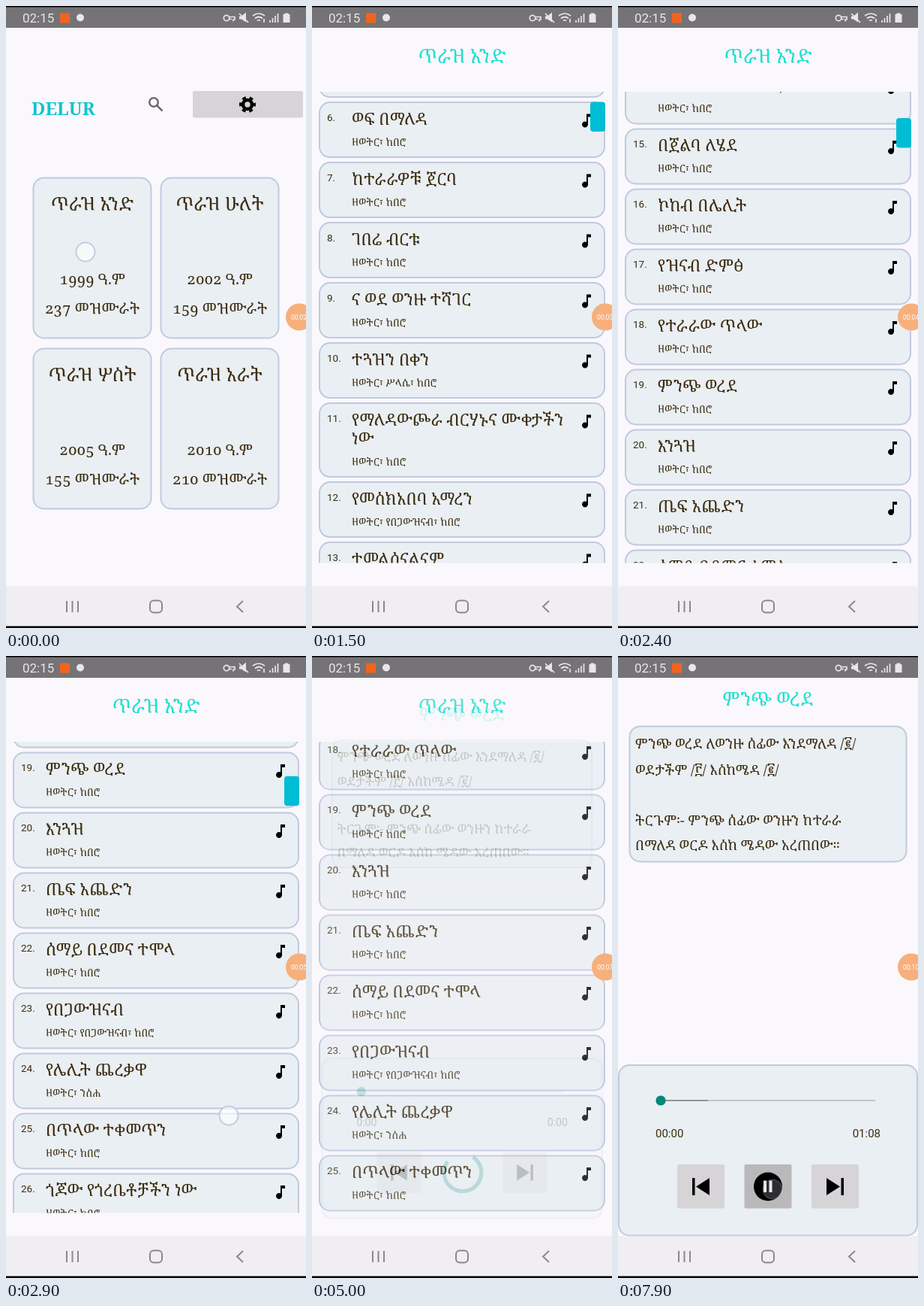
Animation of 400x827 px, one loop 8 s. Source, as an HTML page:

```html
<!DOCTYPE html>
<html lang="am">
<head>
<meta charset="utf-8">
<style>
  html, body { margin: 0; width: 100%; height: 100%; overflow: hidden; background: #faf8fc; }
  svg { display: block; width: 400px; height: 827px; }
  text { font-family: 'Noto Serif Ethiopic', 'Noto Serif', 'Noto Sans Ethiopic', serif; fill: #3d2c10; white-space: pre; }
  .ui { font-family: Roboto, sans-serif; }
  .mid { text-anchor: middle; font-variant-numeric: oldstyle-nums; }
  .head { fill: #1fe0cf; text-anchor: middle; }
  .card { fill: #e9eff3; stroke: #c0cadf; stroke-width: 2; }
  .key { fill: #d6d4d7; }
  .line { fill: none; stroke-width: 2; }
</style>
</head>
<body>
<svg viewBox="0 0 400 827">
  <defs>
    <clipPath id="window"><rect y="114" width="400" height="626.5"/></clipPath>
    <path id="note" d="M12 3v10.55c-.59-.34-1.27-.55-2-.55-2.21 0-4 1.79-4 4s1.79 4 4 4 4-1.79 4-4V7h4V3z"/>
    <rect id="page" y="29" width="400" height="743" fill="#faf8fc"/>
  </defs>

  <g id="home">
    <use href="#page"/>
    <text x="34" y="145" font-size="24" font-weight="700" style="fill:#12c3d0">DELUR</text>
    <g class="line" stroke="#6e6c6e" style="stroke-width:2.5"><circle cx="197" cy="128" r="5.8"/><path d="M201 132l7.500 7.500"/></g>
    <rect class="key" x="249" y="113" width="147" height="35.500" rx="2"/>
    <g fill="none" stroke="#000" transform="translate(322 131)">
      <circle r="6" stroke-width="4.600"/>
      <circle r="9.500" stroke-width="3" stroke-dasharray="5 4.950" stroke-dashoffset="2.500"/>
    </g>
    <g id="volumes"></g>
  </g>

  <g id="list">
    <use href="#page"/>
    <text class="head" x="200" y="76" font-size="26">ጥራዝ አንድ</text>
    <g clip-path="url(#window)"><g id="rows"></g></g>
    <rect id="thumb" x="371" y="115" width="20" height="39.500" rx="4" fill="#00bcd4"/>
  </g>

  <g id="player">
    <use href="#page"/>
    <text class="head" x="200" y="66" font-size="25">ምንጭ ወረደ</text>
    <rect class="card" x="15.500" y="93.500" width="369" height="180" rx="14"/>
    <g id="lyrics"></g>
    <rect class="card" x="1" y="544" width="398" height="226.500" rx="14"/>
    <path class="line" d="M57 591H343" stroke="#c6c6cb"/>
    <path class="line" id="buffer" d="M57 591H120" stroke="#98959a"/>
    <circle cx="57" cy="591" r="6.600" fill="#00867a"/>
    <text class="ui" id="elapsed" x="50" y="640" font-size="15"></text>
    <text class="ui" id="total" x="350" y="640" font-size="15" text-anchor="end"></text>
    <rect class="key" x="79" y="676" width="63" height="58.500" rx="2"/>
    <rect class="key" x="258" y="676" width="63" height="58.500" rx="2"/>
    <path d="M99 694h3.500v23H99zM122 694v23l-18-11.500zM278 694v23l18-11.500zM297.500 694h3.500v23h-3.500z"/>
    <path id="spinner" fill="none" stroke="#00867a" stroke-width="5.500"/>
    <g id="toggle">
      <rect id="toggleKey" x="168.500" y="676" width="63" height="58.500" rx="2"/>
      <circle cx="200" cy="705.500" r="19"/>
      <path id="symbol" fill="#e6e4e6"/>
    </g>
  </g>

  <circle id="touch" r="12.500" fill="#fff" fill-opacity=".6" stroke="#c3cce2" stroke-width="2"/>

  <g id="system">
    <rect width="400" height="29" fill="#757376"/>
    <rect width="400" height="1.500"/>
    <text class="ui" x="22" y="22" font-size="17" style="fill:#e8e6e8">02:15</text>
    <rect x="72" y="9.500" width="13" height="13" fill="#f2641e"/>
    <circle cx="99" cy="15.500" r="5" fill="#e8e6e8"/>
    <g class="line" stroke="#e8e6e8" style="stroke-width:1.700">
      <circle cx="294" cy="16" r="3.700"/><path d="M297 14.500h8v3.500h-2v2.500M297 17.500h4"/>
      <path d="M311 10l12 12M329 13q8-6 16 0M332 16.500q5-4 10 0M335 19.500q2-1.500 4 0M344 17v5"/>
      <path d="M352 19v3M355.500 16v6M359 13v9M362.500 10v12"/>
    </g>
    <path d="M311 13.500h3l6-5v13l-6-4h-3zM371.500 9.500h5v1.500h2v11h-9v-11h2z" fill="#e8e6e8"/>
    <rect y="771.500" width="400" height="53" fill="#f0eef2"/>
    <rect y="824.500" width="400" height="2.500"/>
    <g class="line" stroke="#8a888b">
      <path d="M81 791v15M88.500 791v15M96 791v15M316 791l-8 7.500 8 7.500"/>
      <rect x="192" y="790.500" width="16" height="16" rx="5"/>
    </g>
    <circle cx="391" cy="413.500" r="18" fill="#f7b07c"/>
    <text class="ui" id="clock" x="380" y="417" font-size="8.500" style="fill:#fff"></text>
  </g>
</svg>

<script>
const $ = id => document.getElementById(id);
const label = (x, y, size, str, cls = '') => `<text class="${cls}" x="${x}" y="${y}" font-size="${size}">${str}</text>`;
const card = (x, y, w, h) => `<rect class="card" x="${x}" y="${y}" width="${w}" height="${h}" rx="14"/>`;
const ramp = (t, from, to) => Math.min(1, Math.max(0, (t - from) / (to - from)));
const glide = x => 1 - (1 - x ** 1.4) ** 2.4;
const swift = x => 1 - (1 - x ** 2.5) ** 8;

const volumeData = [['አንድ', 1999, 237], ['ሁለት', 2002, 159], ['ሦስት', 2005, 155], ['አራት', 2010, 210]];
$('volumes').innerHTML = volumeData.map(([name, year, count], i) => {
  const x = 36.5 + i % 2 * 170, y = 228.5 + (i >> 1) * 227, mid = x + 78.5;
  return card(x, y, 157, 213) + label(mid, y + 43, 24.5, 'ጥራዝ ' + name, 'mid') +
    label(mid, y + 141, 20, year + ' ዓ.ም', 'mid') + label(mid, y + 180, 20, count + ' መዝሙራት', 'mid');
}).join('');

const songs = ['ተራመዱ', 'ብሩህ የማለዳፀሐይ', 'ነፋስ በተራራ ወረደ', 'ዘነበልን እና አዝመራችንም|ደረሰልን', 'ዝናብና ለአበቦቹም',
  'ወፍ በማለዳ', 'ከተራራዎቹ ጀርባ', 'ገበሬ ብርቱ', 'ና ወደ ወንዙ ተሻገር', 'ተጓዝን በቀን', 'የማለዳውጮራ ብርሃኑና ሙቀታችን|ነው',
  'የመስክአበባ አማረን', 'ተመልሰናልናም', 'ለዛሬ ጉዞ ለመጣው/ት', 'በጀልባ ለሄደ', 'ኮከብ በሌሊት', 'የዝናብ ድምፅ', 'የተራራው ጥላው',
  'ምንጭ ወረደ', 'እንጓዝ', 'ጤፍ አጨድን', 'ሰማይ በደመና ተሞላ', 'የበጋውዝናብ', 'የሌሊት ጨረቃዋ', 'በጥላው ተቀመጥን', 'ጎጆው የጎረቤቶቻችን ነው'];
const tags = { 10: 'ሥላሴ፣ ከበሮ', 12: 'የበጋውዝናብ፣ ከበሮ', 23: 'የበጋውዝናብ፣ ከበሮ', 24: 'ንስሐ' };
let nextRow = 115;
$('rows').innerHTML = songs.map((song, i) => {
  const y = nextRow, lines = song.split('|'), extra = (lines.length - 1) * 25;
  nextRow += 80 + extra;
  return card(10, y + .5, 380, 73 + extra) + label(20, y + 25, 13.5, `${i + 1}.`, 'ui') +
    lines.map((line, n) => label(53, y + 30 + n * 25, 22, line)).join('') +
    label(53, y + 58 + extra, 13.5, 'ዘወትር፣ ' + (tags[i + 1] || 'ከበሮ')) +
    `<use href="#note" x="354" y="${y + 13}"/>`;
}).join('');

const verses = [[123, 'ምንጭ ወረደ ለወንዙ ሰፊው እንደማለዳ /፪/'], [158, 'ወደታችም /፫/ እስከሜዳ /፪/'],
  [225, 'ትርጉም፡- ምንጭ ሰፊው ወንዙን ከተራራ'], [258, 'በማለዳ ወርዶ እስከ ሜዳው አረጠበው።']];
$('lyrics').innerHTML = verses.map(([y, line]) => label(23, y, 18.5, line)).join('');

// Each touch: start, end, then x, y at start and x, y at end.
const touches = [[0, 200, 106, 327, 106, 327], [1100, 1400, 300, 600, 310, 380], [2000, 2300, 297, 620, 308, 380],
  [2900, 3600, 297, 611, 297, 667], [4800, 5000, 170, 218, 170, 218], [7800, 8000, 206, 709, 206, 709]];

function enter(id, p) {
  const s = .92 + .08 * glide(p);
  $(id).setAttribute('opacity', p);
  $(id).setAttribute('transform', `translate(200 400) scale(${s}) translate(-200 -400)`);
}

function spinnerPath(t) {
  const turn = (t - 4540) / 1333, p = turn % 1;
  const base = turn * .25 + (t - 4540) / 2222 - .45;
  const from = base + .75 * swift(ramp(p, .5, 1));
  const to = base + .75 * swift(ramp(p, 0, .5)) + .02;
  const point = a => `${201 + 26.5 * Math.cos(a * 2 * Math.PI)} ${705.5 + 26.5 * Math.sin(a * 2 * Math.PI)}`;
  return `M${point(from)}A26.5 26.5 0 ${to - from > .5 ? 1 : 0} 1 ${point(to)}`;
}

function draw(t) {
  enter('list', ramp(t, 200, 600));
  enter('player', ramp(t, 4900, 5400));

  const scroll = 577 * glide(ramp(t, 1000, 1950)) + 900 * glide(ramp(t, 2000, 2900)) - 56 * glide(ramp(t, 2900, 3800));
  $('rows').setAttribute('transform', `translate(0 ${-scroll})`);
  $('thumb').setAttribute('y', 115 + scroll * .0303);
  $('thumb').setAttribute('opacity', 1 - ramp(t, 3800, 4200));

  const ready = t >= 7000, pressed = t >= 7800;
  $('elapsed').textContent = ready ? '00:00' : '0:00';
  $('total').textContent = ready ? '01:08' : '0:00';
  $('buffer').setAttribute('opacity', ready ? 1 : 0);
  $('toggle').setAttribute('opacity', ready ? 1 : 0);
  $('toggleKey').setAttribute('fill', pressed ? '#bab8bb' : '#d6d4d7');
  $('symbol').setAttribute('d', t >= 7900 ? 'M194 697.5h4v15.500h-4zM201.500 697.5h4v15.500h-4z' : 'M195 696.500v18l13-9z');
  $('spinner').setAttribute('opacity', ready ? 0 : 1);
  $('spinner').setAttribute('d', spinnerPath(Math.max(t, 4600)));

  const touch = touches.find(([a, b]) => t >= a && t < b);
  $('touch').setAttribute('opacity', touch ? (pressed ? .3 : 1) : 0);
  if (touch) {
    const [a, b, x0, y0, x1, y1] = touch, p = ramp(t, a, b);
    $('touch').setAttribute('cx', x0 + (x1 - x0) * p);
    $('touch').setAttribute('cy', y0 + (y1 - y0) * p);
  }
  $('clock').textContent = '00:' + String(2 + Math.floor((t + 400) / 1000)).padStart(2, '0');
}

function tick() {
  draw(Math.floor(performance.now() % 8000 / 100) * 100);
  requestAnimationFrame(tick);
}
tick();
</script>
</body>
</html>
```
